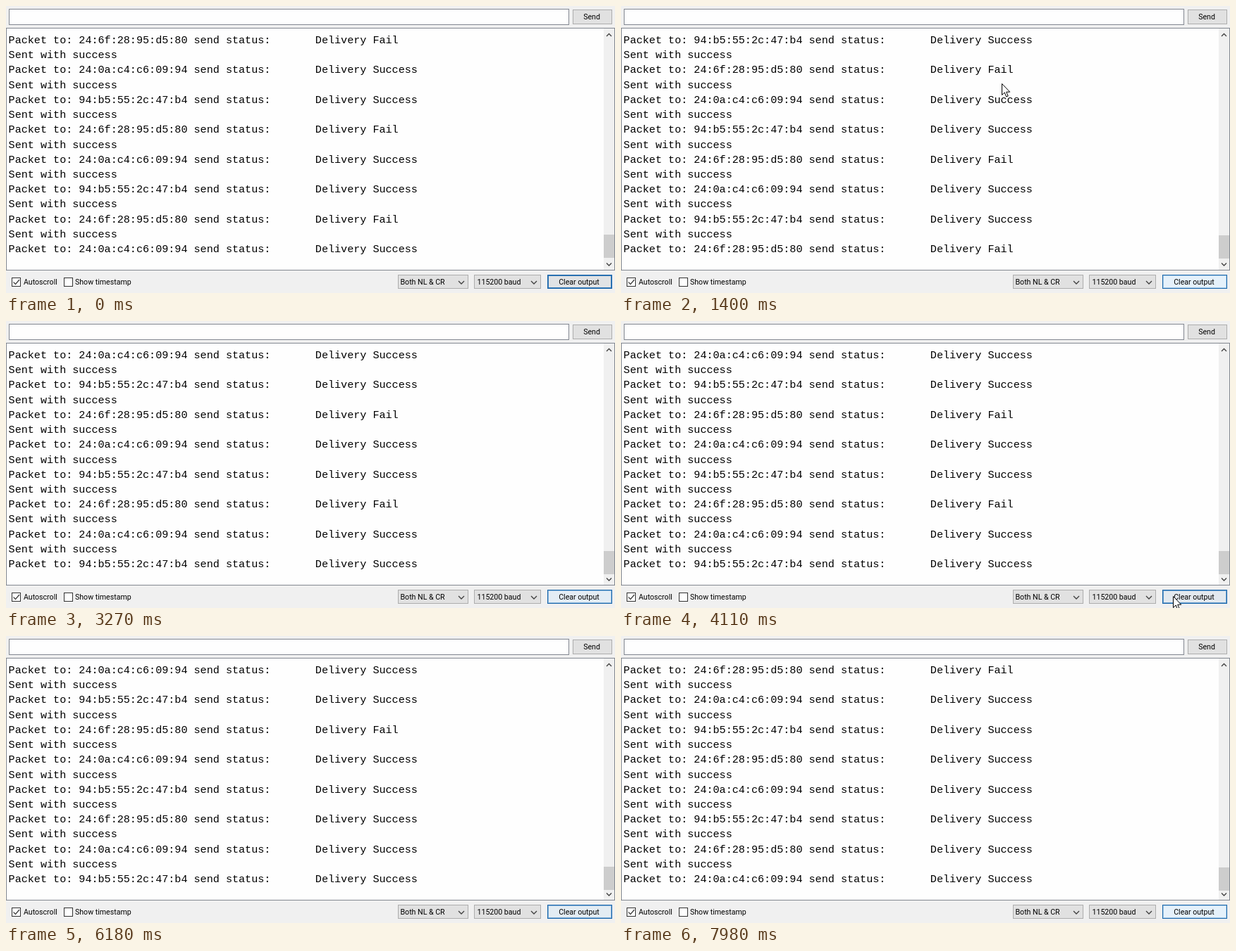
Write an HTML page that moves like this. It is 864 px wide and 408 px high and loops after 8000 ms.

```html
<!DOCTYPE html>
<html lang="en">
<head>
<meta charset="utf-8">
<title>Serial monitor</title>
<style>
  html, body { margin: 0; width: 100%; height: 100%; overflow: hidden; background: #f0f0f0; }
  svg { display: block; width: 100vw; height: 100vh; }
  text { white-space: pre; fill: #000; }
  .ui text { font: 10.6px Roboto, sans-serif; }
  #log text { font: 15.12px "Liberation Mono", monospace; }
  .btn { fill: #e1e1e1; stroke: #adadad; }
  .field { fill: #fefefe; stroke: #828790; }
  .line { fill: none; stroke: #404040; stroke-width: 1.3; }
</style>
</head>
<body>
<svg viewBox="0 0 864 408" preserveAspectRatio="none">
  <rect width="864" height="408" fill="#f0f0f0"/>
  <g class="ui">
    <rect class="field" x="4.5" y="4.5" width="794" height="22" stroke="#a8a8a8"/>
    <rect class="btn" x="804.5" y="5.5" width="55" height="20"/>
    <text x="831" y="19" text-anchor="middle">Send</text>

    <rect class="field" x=".5" y="31.5" width="863" height="344"/>
    <rect x="848" y="32" width="15" height="343" fill="#f0f0f0"/>
    <rect id="thumb" x="848" y="325" width="15" height="33" fill="#cdcdcd"/>
    <path class="line" d="M852 43l3.5-3.5 3.5 3.5M852 365.5l3.5 3.5 3.5-3.5"/>

    <rect class="field" x="8.5" y="386.5" width="12" height="12" style="stroke:#333"/>
    <path class="line" d="M10.5 392.5l3 3 5.5-6.5"/>
    <text x="25" y="396">Autoscroll</text>
    <rect class="field" x="82.5" y="386.5" width="12" height="12" style="stroke:#333"/>
    <text x="98" y="396">Show timestamp</text>

    <rect class="btn" x="556.5" y="382.5" width="99" height="19"/>
    <text x="559.5" y="396">Both NL &amp; CR</text>
    <path class="line" d="M642 391l4 4 4-4"/>
    <rect class="btn" x="664.5" y="382.5" width="94" height="19"/>
    <text x="668.5" y="396">115200 baud</text>
    <path class="line" d="M745 391l4 4 4-4"/>

    <rect x="769" y="383" width="90" height="18" fill="#e1e1e1" stroke="#1c67ab" stroke-width="2"/>
    <rect id="glow" x="769.5" y="383.5" width="89" height="17" fill="#e5f1fb" stroke="#a9cdea"/>
    <text x="813" y="396" text-anchor="middle">Clear output</text>
  </g>
  <g id="log"></g>
  <path id="cursor" d="M.5.5v16l3.7-3.5 2.5 6 2.5-1-2.5-5.8h5z" fill="#fff" stroke="#000"/>
</svg>
<script>
const LOOP = 8000, FIRST = 400, STEP = 945, ROWS = 15, PITCH = 21.22;
const PEERS = ["24:6f:28:95:d5:80", "24:0a:c4:c6:09:94", "94:b5:55:2c:47:b4"];
const RECOVERED = 12; // packet from which the first peer answers
const PULSE = 2193, PULSE_PEAK = 1400;
const PATHS = [
  [[950, 585, -22], [1400, 540, 110], [1850, 590, -22]],
  [[3970, 790, 410], [4110, 783, 391], [4200, 772, 372], [4700, 690, -22]]
];

const $ = id => document.getElementById(id);
const log = $("log"), thumb = $("thumb"), glow = $("glow"), cursor = $("cursor");

const rows = Array.from({ length: ROWS }, (_, i) => {
  const row = document.createElementNS(log.namespaceURI, "text");
  row.setAttribute("x", 3.6);
  row.setAttribute("y", 53 + i * PITCH);
  return log.appendChild(row);
});

function packet(k) {
  const ok = k % 3 || k >= RECOVERED;
  return `Packet to: ${PEERS[k % 3]} send status:`.padEnd(48) +
    `Delivery ${ok ? "Success" : "Fail"}`;
}

function pointer(t) {
  const path = PATHS.find(p => t >= p[0][0] && t < p[p.length - 1][0]);
  if (!path) return null;
  const i = path.findIndex(p => p[0] > t);
  const [t0, x0, y0] = path[i - 1], [t1, x1, y1] = path[i];
  const f = (t - t0) / (t1 - t0);
  return [x0 + (x1 - x0) * f, y0 + (y1 - y0) * f];
}

let shown = -1;
function draw(t) {
  const sent = Math.max(0, Math.floor((t - FIRST) / STEP) + 1);
  if (sent !== shown) {
    shown = sent;
    rows.forEach((row, i) => {
      row.textContent = i % 2 ? "Sent with success" : packet(sent + i / 2);
    });
    thumb.setAttribute("y", 325 + Math.round(sent * 4 / 9));
  }
  const wave = Math.cos((t - PULSE_PEAK) / PULSE * 2 * Math.PI);
  glow.setAttribute("opacity", (0.5 + 0.5 * wave).toFixed(3));

  const at = pointer(t);
  cursor.setAttribute("visibility", at ? "visible" : "hidden");
  if (at) cursor.setAttribute("transform", `translate(${at.map(Math.round)})`);
}

const start = performance.now();
function tick() {
  draw((performance.now() - start) % LOOP);
  requestAnimationFrame(tick);
}
draw(0);
requestAnimationFrame(tick);
</script>
</body>
</html>
```
